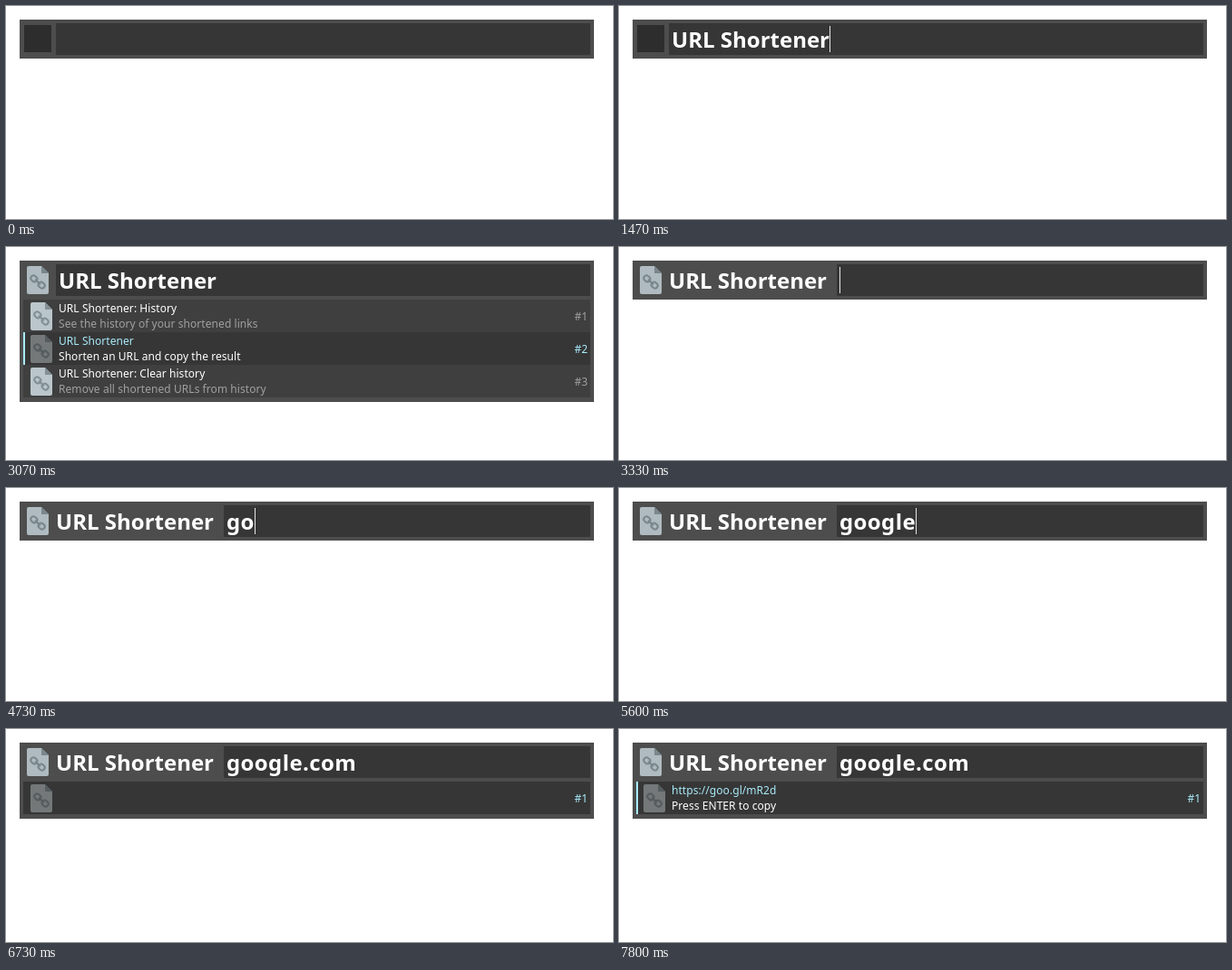
An HTML page with a canvas for the animation above (8 s loop, 669 px wide and 235 px high).

```html
<!DOCTYPE html>
<html lang="en">
<head>
<meta charset="utf-8">
<title>URL Shortener</title>
<style>
  html, body { margin: 0; width: 100%; height: 100%; overflow: hidden; background: #fff; }
  canvas { display: block; }
</style>
</head>
<body>
<canvas id="stage" width="669" height="235"></canvas>
<script>
const ctx = document.getElementById('stage').getContext('2d');
const LOOP = 8000;
const FRAME = '#4d4d4d', FIELD = '#363636', ROW = '#3f3f3f';
const CYAN = '#a8ebfa', WHITE = '#ffffff', GREY = '#a0a0a0';
const BIG = 'bold 24px "Noto Sans", "Open Sans", sans-serif';
const SMALL = '12px "Noto Sans", "Open Sans", sans-serif';

const NAME = 'URL Shortener';
const QUERY = 'google.com';
const ACTIONS = [
  [NAME + ': History', 'See the history of your shortened links'],
  [NAME, 'Shorten an URL and copy the result'],
  [NAME + ': Clear history', 'Remove all shortened URLs from history']
];
const LINK = ['https://goo.gl/mR2d', 'Press ENTER to copy'];

// Times of the key presses that type the query
const KEYS = [4530, 4730, 4930, 5070, 5130, 5600, 5800, 5930, 6000, 6070];
// Spans in which the caret is lit
const CARET = [[800, 1330], [1470, 2000], [2530, 3070], [3330, 3870], [4400, 6600], [7270, 7800]];

function rect(x, y, w, h, color) {
  ctx.fillStyle = color;
  ctx.fillRect(x, y, w, h);
}

function text(str, x, y, font, color, spacing = 0, align = 'left') {
  ctx.font = font;
  ctx.letterSpacing = spacing + 'px';
  ctx.textAlign = align;
  ctx.fillStyle = color;
  ctx.fillText(str, x, y);
  return ctx.measureText(str).width;
}

function fileIcon(x, y, body, mark) {
  ctx.save();
  ctx.translate(x, y);
  ctx.fillStyle = body;
  ctx.beginPath();
  ctx.moveTo(2, 0);
  ctx.lineTo(16, 0);
  ctx.lineTo(24, 8);
  ctx.arcTo(24, 31, 22, 31, 2);
  ctx.arcTo(0, 31, 0, 29, 2);
  ctx.arcTo(0, 0, 2, 0, 2);
  ctx.fill();

  ctx.fillStyle = mark;
  ctx.beginPath();
  ctx.moveTo(16, 0);
  ctx.lineTo(24, 8);
  ctx.lineTo(16, 8);
  ctx.fill();

  ctx.translate(12, 17.5);
  ctx.rotate(Math.PI / 4.4);
  ctx.strokeStyle = mark;
  ctx.lineWidth = 2;
  for (const side of [-1, 1]) {
    ctx.beginPath();
    ctx.roundRect(side * 5.5 - 3.7, -3, 7.4, 6, 3);
    ctx.stroke();
  }
  ctx.beginPath();
  ctx.moveTo(-4, 0);
  ctx.lineTo(4, 0);
  ctx.stroke();
  ctx.restore();
}

function row(i, [title, info], active, bar = active) {
  const y = 58 + i * 36;
  rect(19, y, 625, 36, active ? FIELD : ROW);
  if (bar) rect(19, y, 2, 36, CYAN);
  if (active) fileIcon(27, y + 3, '#747879', '#555c5e');
  else fileIcon(27, y + 3, '#bac6cb', '#829095');
  text(title, 58, y + 14, SMALL, active ? CYAN : WHITE, 0.06);
  text(info, 58, y + 31, SMALL, active ? WHITE : GREY, 0.06);
  text('#' + (i + 1), 641, y + 23, SMALL, active ? CYAN : GREY, 0, 'right');
}

function draw(t) {
  const chosen = t >= 3330;
  const listed = t >= 1530 && !chosen;
  const result = t >= 6730;
  const fieldX = chosen ? 240 : 55;

  rect(0, 0, 669, 235, '#ffffff');
  rect(15, 15, 633, listed ? 156 : result ? 84 : 43, FRAME);
  rect(fieldX, 19, 644 - fieldX, 35, FIELD);

  if (t < 1530) rect(20, 21, 30, 30, '#2d2d2d');
  else fileIcon(23, 21, '#afbbc0', '#79878c');

  let typed = t >= 1470 ? NAME : '', spacing = 0;
  if (chosen) {
    text(NAME, 55, 46, BIG, WHITE);
    typed = QUERY.slice(0, KEYS.filter(k => t >= k).length);
    spacing = 0.4;
  }
  const width = text(typed, fieldX + 3, 46, BIG, WHITE, spacing);
  if (CARET.some(([a, b]) => t >= a && t < b)) {
    rect(fieldX + 3 + Math.round(width), 22, 1, 29, '#e6e6e6');
  }

  if (listed) ACTIONS.forEach((a, i) => row(i, a, i === (t < 2270 ? 0 : 1)));
  if (result) {
    const ready = t >= 7070;
    row(0, ready ? LINK : ['', ''], true, ready);
  }
}

const start = performance.now();
function tick() {
  draw((performance.now() - start) % LOOP);
  requestAnimationFrame(tick);
}
tick();
</script>
</body>
</html>
```
